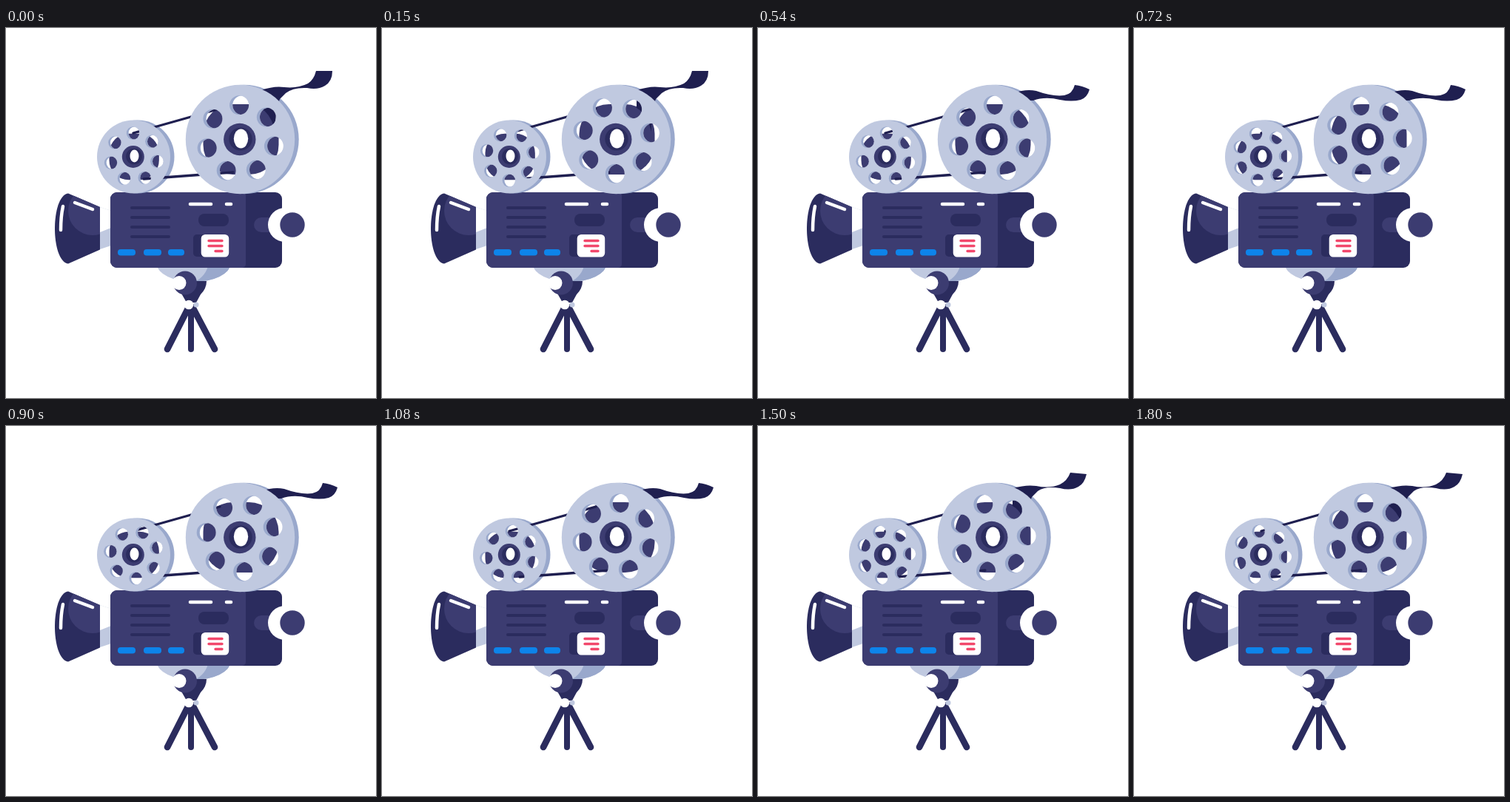
An HTML page with a canvas for the animation above (1830 ms loop, 500 px wide and 500 px high).

```html
<!DOCTYPE html>
<html>
<head>
<meta charset="utf-8">
<style>
html, body { margin: 0; width: 100%; height: 100%; overflow: hidden; background: #fff }
canvas { display: block }
</style>
</head>
<body>
<canvas id="stage" width="500" height="500"></canvas>
<script>
const c = document.getElementById('stage').getContext('2d');
const LOOP = 1830, STEP = 30, HOLES = 7;
const NAVY = '#2b2c5e', INDIGO = '#3c3c71', INK = '#1f1f50';
const PALE = '#c0c9e0', SHADE = '#99a8cc', WHITE = '#fff';

function shape(d, color) {
  c.fillStyle = color;
  c.fill(new Path2D(d));
}
function line(d, color, width) {
  c.strokeStyle = color;
  c.lineWidth = width;
  c.lineCap = 'round';
  c.stroke(new Path2D(d));
}
function oval(x, y, rx, color, ry = rx) {
  c.fillStyle = color;
  c.beginPath();
  c.ellipse(x, y, rx, ry, 0, 0, 7);
  c.fill();
}
function box(x, y, w, h, r, color) {
  c.fillStyle = color;
  c.beginPath();
  c.roundRect(x, y, w, h, r);
  c.fill();
}
function clipCircle(x, y, r) {
  c.beginPath();
  c.arc(x, y, r, 0, 7);
  c.clip();
}

// Loose film end in its three poses; the raised ones also run down behind the reel
const behind = 'M344 98L372 92Q364 106 364 140Q358 116 344 108Z';
const tails = [
  behind + 'M345 84Q362 78 376 80Q394 82 408 75Q416 70 419 58L441 58Q441 72 431 78Q421 84 407 81Q388 80 378 88L367 99L352 96Z',
  'M345 88Q362 82 376 85Q398 93 414 91Q425 89 428 77Q438 78 448 83Q445 94 436 97Q424 100 408 97Q388 92 372 98L352 98Z',
  behind + 'M345 84Q362 79 376 81Q394 85 408 79Q418 74 422 63L444 65Q441 78 433 82Q423 88 408 84Q388 81 378 88L367 99L352 96Z'
];

const small = { x: 172.5, y: 174, r: 49.5, orbit: 32, hole: 8.7, roll: 33, hub: 15, ex: 6, ey: 8.5 };
const big = { x: 316.5, y: 150.5, r: 73.7, orbit: 46.3, hole: 13, roll: 50, hub: 21.7, ex: 9.7, ey: 13 };

function film(tail) {
  for (const { x, y, roll } of [small, big])
    box(x - roll, y - roll * .95, roll * 2.04, roll * 1.9, roll * .8, INDIGO);
  line('M172 142L289 109M186 204L307 195', INK, 3.3);
  shape(tails[tail], INK);
}

function reel(k, angle, tail) {
  oval(k.x, k.y, k.r, PALE);
  for (let i = 0; i < HOLES; i++) {
    const a = angle + i * 2 * Math.PI / HOLES;
    const x = k.x + k.orbit * Math.sin(a), y = k.y - k.orbit * Math.cos(a);
    c.save();
    clipCircle(x, y, k.hole);
    oval(x, y, k.hole + 1, SHADE);
    clipCircle(x + k.hole * .32, y, k.hole);
    oval(x, y, k.hole * 2, WHITE);
    film(tail);
    c.restore();
  }
  oval(k.x - .7, k.y, k.hub, INDIGO);
  oval(k.x + .5, k.y - .5, k.hub * .72, NAVY);
  oval(k.x + 1, k.y - 1, k.ex, WHITE, k.ey);
}

function lens() {
  const bell = 'M84 223.5L127 242V299.5L84 318.5C60 315 60 227 84 223.5Z';
  shape(bell, NAVY);
  c.save();
  c.clip(new Path2D(bell));
  oval(117, 247, 33, INDIGO);
  c.restore();
  line('M77 241Q74 255 74 273M93 236L117 245', WHITE, 4.5);
  shape('M127 242L142 247V294L127 299Z', PALE);
  shape('M127 242L142 247V270L127 276Z', WHITE);
}

function stand() {
  c.save();
  c.beginPath();
  c.ellipse(253.5, 319, 49.5, 24, 0, 0, 7);
  c.clip();
  c.fillStyle = PALE;
  c.fillRect(200, 310, 110, 40);
  shape('M274 318H304V345H250Q270 338 274 318Z', SHADE);
  c.restore();
  shape('M240 342H271Q271 352 263 360L257 371H244L236 357Z', NAVY);
  line('M247 377L218 434M252 377L282 434', NAVY, 8.7);
  line('M250 377V434', NAVY, 8);
  oval(242, 344.5, 16, INDIGO);
  oval(234, 344.5, 9.5, WHITE);
  oval(257, 374, 3.5, PALE);
  oval(247, 374, 6.3, WHITE);
}

function body() {
  box(141, 222, 232, 102, 9, NAVY);
  box(141, 222, 183, 102, [9, 5, 5, 9], INDIGO);
  for (let y = 243; y < 290; y += 13) line(`M170 ${y}H220`, NAVY, 4);
  line('M249 238H277M298 238H304', WHITE, 4.6);
  box(260, 251, 41, 17, 8, NAVY);
  for (const [x, w] of [[151, 24], [186, 24], [219, 22]]) box(x, 299, w, 8.6, 4, '#0d84ea');
  box(253, 279, 24, 30, 5, NAVY);
  box(263.7, 279, 37.5, 30.6, 5.5, WHITE);
  line('M274 287.5H292M274 294.5H292M283 301.5H292', '#f2476b', 3.4);
  box(335, 256, 30, 20, 10, INDIGO);
  oval(377, 266, 23, WHITE);
  oval(387, 266, 16.7, INDIGO);
}

function draw(now) {
  const t = Math.floor(now % LOOP / STEP) * STEP;
  const angle = t / LOOP * 2 * Math.PI - .03;
  const tail = t < 420 ? 0 : t < 1200 ? 1 : 2;
  c.fillStyle = WHITE;
  c.fillRect(0, 0, 500, 500);
  stand();
  lens();
  body();
  // The film runs between the back and front discs
  for (const k of [small, big]) oval(k.x + 5.5, k.y, k.r, SHADE);
  film(tail);
  for (const k of [small, big]) reel(k, angle, tail);
}

const start = performance.now();
function tick() {
  draw(performance.now() - start);
  requestAnimationFrame(tick);
}
tick();
</script>
</body>
</html>
```
